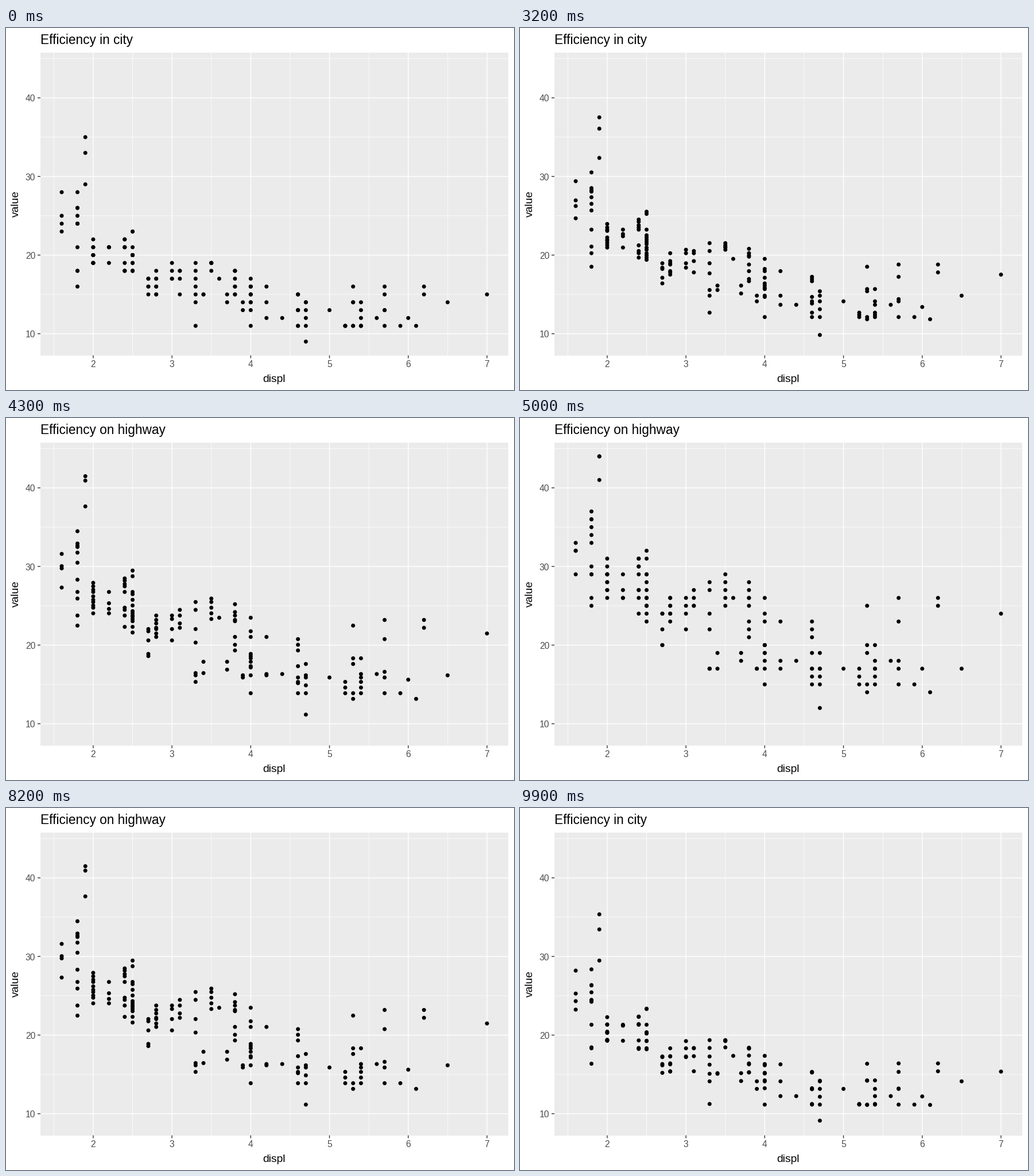
A matplotlib script for the animation above (10 s loop, 885 by 632 pixels).

```python
import matplotlib.pyplot as plt
import numpy as np
from matplotlib.animation import FuncAnimation

W, H, DPI = 885, 632, 64
PT = 72 / DPI                                   # points per pixel
LEFT, RIGHT, TOP, BOTTOM = 60, 875, 43, 571.5   # panel edges in pixels
XLIM, YLIM = (1.33, 7.27), (7.25, 45.75)
FRAMES, STEP = 100, 25                          # each phase lasts 25 frames

# engine size -> {city value: highway values}
SMALL = {
    1.6: {23: [29], 24: [32], 25: [32], 28: [33]},
    1.8: {16: [25], 18: [26, 29], 21: [29], 24: [30, 33, 36], 25: [36],
          26: [34, 35], 28: [37]},
    1.9: {29: [41], 33: [44], 35: [44]},
    2.0: {19: [26, 27, 28, 29], 20: [27, 28, 31], 21: [29, 30], 22: [29]},
    2.2: {19: [26], 21: [26, 27, 29]},
    2.4: {18: [24, 26, 27], 19: [27], 21: [29, 30, 31], 22: [30, 31]},
    2.5: {18: [23, 24, 25, 26], 19: [25, 26], 20: [25, 26, 27, 28, 29],
          21: [29], 23: [31, 32]},
}
MEDIUM = {
    2.7: {15: [20], 16: [20, 24], 17: [22, 24]},
    2.8: {15: [24, 25], 16: [23, 26], 17: [24, 25], 18: [26]},
    3.0: {17: [22, 24], 18: [26], 19: [25]},
    3.1: {15: [25], 17: [25], 18: [26, 27]},
    3.3: {11: [17], 14: [17], 15: [17], 16: [22], 17: [24], 18: [27],
          19: [28]},
    3.4: {15: [17, 19]},
    3.5: {18: [29], 19: [25, 26, 27, 28]},
    3.6: {17: [26]},
    3.7: {14: [18], 15: [19]},
    3.8: {15: [21, 22], 16: [23, 26], 17: [27], 18: [25, 26, 28]},
    3.9: {13: [17], 14: [17]},
}
LARGE = {
    4.0: {11: [15], 13: [19], 14: [17, 20], 15: [18, 19, 20],
          16: [20, 23, 24], 17: [26]},
    4.2: {12: [18], 14: [17], 16: [23]},
    4.4: {12: [18]},
    4.6: {11: [15, 17], 13: [16, 17, 19], 15: [21, 22, 23]},
    4.7: {9: [12], 11: [15], 12: [16], 13: [17], 14: [17, 19]},
    5.0: {13: [17]},
    5.2: {11: [15, 16, 17]},
    5.3: {11: [14, 15], 14: [19, 20], 16: [25]},
    5.4: {11: [15, 16, 17], 12: [18], 13: [17], 14: [20]},
    5.6: {12: [18]},
    5.7: {11: [15], 13: [17, 18], 15: [23], 16: [26]},
    5.9: {11: [15]},
    6.0: {12: [17]},
    6.1: {11: [14]},
    6.2: {15: [25], 16: [26]},
    6.5: {14: [17]},
    7.0: {15: [24]},
}


def flatten(*groups):
    rows = [(size, city, hwy)
            for group in groups
            for size, cars in group.items()
            for city, values in cars.items()
            for hwy in values]
    return np.array(rows, dtype=float).T


displ, city, highway = flatten(SMALL, MEDIUM, LARGE)

plt.rcParams["font.family"] = "Liberation Sans"
fig = plt.figure(figsize=(W / DPI, H / DPI), dpi=DPI, facecolor="white")
ax = fig.add_axes([LEFT / W, 1 - BOTTOM / H, (RIGHT - LEFT) / W, (BOTTOM - TOP) / H])
ax.set(xlim=XLIM, ylim=YLIM, facecolor="#EBEBEB", xticks=[], yticks=[])
for spine in ax.spines.values():
    spine.set_visible(False)


def to_px(x, y):
    px = LEFT + (x - XLIM[0]) / (XLIM[1] - XLIM[0]) * (RIGHT - LEFT)
    py = BOTTOM - (y - YLIM[0]) / (YLIM[1] - YLIM[0]) * (BOTTOM - TOP)
    return px, py


def label(x, y, text, size, color="black", **kw):
    return fig.text(x / W, 1 - y / H, text, fontsize=size * PT, color=color,
                    va=kw.pop("va", "baseline"), **kw)


def tick(x0, y0, x1, y1):
    fig.add_artist(plt.Line2D([x0 / W, x1 / W], [1 - y0 / H, 1 - y1 / H],
                              color="#333333", lw=1.4 * PT, snap=False,
                              solid_capstyle="butt"))


def grid(draw, values, width):
    for v in values:
        draw(v, color="white", lw=width * PT, snap=False, zorder=1)


grid(ax.axvline, np.arange(1.5, 7), 0.75)
grid(ax.axhline, range(15, 50, 10), 0.75)
grid(ax.axvline, range(2, 8), 1.45)
grid(ax.axhline, range(10, 50, 10), 1.45)

for v in range(2, 8):
    x, _ = to_px(v, 0)
    tick(x, BOTTOM, x, BOTTOM + 5)
    label(x, 592.3, str(v), 15.6, "#4D4D4D", ha="center")
for v in range(10, 50, 10):
    _, y = to_px(0, v)
    tick(LEFT - 5, y, LEFT, y)
    label(51.3, y + 6.3, str(v), 15.6, "#4D4D4D", ha="right")

label((LEFT + RIGHT) / 2, 618, "displ", 19.3, ha="center")
label(26, (TOP + BOTTOM) / 2, "value", 19.3, ha="right", va="center",
      rotation=90)
title = label(LEFT, 28, "", 22.6)
dots = ax.scatter(displ, city, s=(7 * PT) ** 2, c="black",
                  edgecolors="none", linewidths=0, zorder=3)


def update(i):
    phase, step = divmod(max(i - 1, 0) + (i > 0), STEP)
    share = step / STEP
    mix = (0, share, 1, 1 - share)[phase]
    late = step > STEP // 2 + 1
    on_highway = (False, late, True, not late)[phase]
    dots.set_offsets(np.column_stack([displ, city + mix * (highway - city)]))
    title.set_text("Efficiency on highway" if on_highway
                   else "Efficiency in city")
    return dots, title


anim = FuncAnimation(fig, update, frames=FRAMES, interval=100,
                     init_func=lambda: update(0), repeat=True, repeat_delay=0)
plt.show()
```
